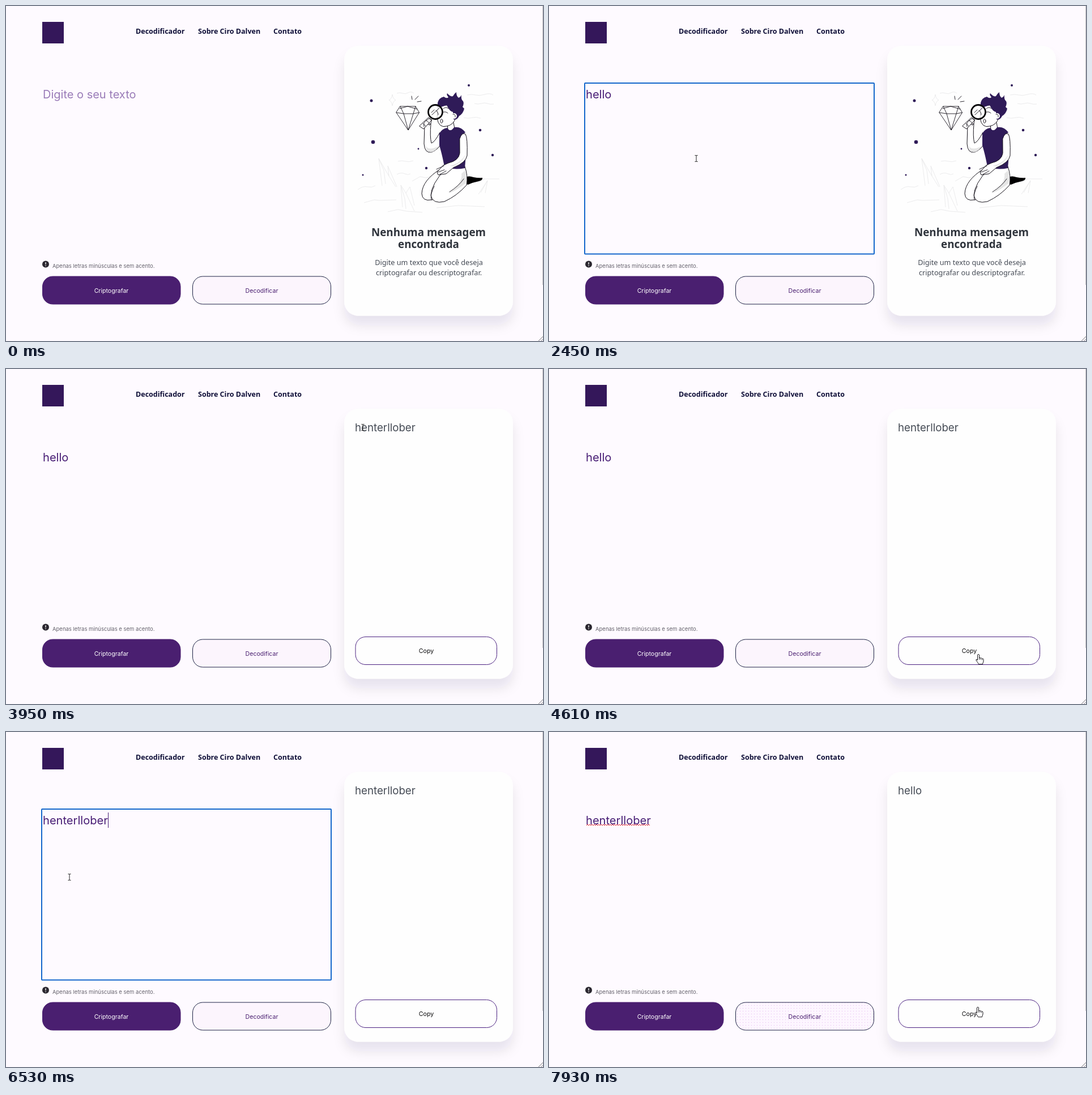
Animation of 948 by 591 pixels, one loop 7.99 s. Source, as an HTML page:

```html
<!DOCTYPE html>
<html lang="pt">
<head>
<meta charset="utf-8">
<title>Decodificador</title>
<style>
  html, body { margin: 0; width: 100%; height: 100%; overflow: hidden; background: #fefaff; }
  svg { display: block; width: 948px; height: 591px; }
  text { font-family: Inter, "Open Sans", sans-serif; white-space: pre; }
  .noto { font-family: "Noto Sans", "Open Sans", sans-serif; }
  .bold { font-weight: 700; }
  .mid { text-anchor: middle; }
  .faint { fill: none; stroke: #e9e9ea; stroke-width: .9; }
  .ink { fill: #fff; stroke: #17141c; stroke-width: 1; stroke-linejoin: round; stroke-linecap: round; }
  .line { fill: none; stroke: #17141c; stroke-width: .9; stroke-linecap: round; stroke-linejoin: round; }
  .shade { fill: #e6e6e6; }
  .plum { fill: #2f1b58; }
</style>
</head>
<body>
<svg viewBox="0 0 948 591">
  <defs>
    <filter id="shadow" x="-20%" y="-20%" width="140%" height="140%">
      <feDropShadow dx="0" dy="17" stdDeviation="10" flood-color="#25123a" flood-opacity=".09"/>
    </filter>
    <pattern id="dots" width="5" height="5" patternUnits="userSpaceOnUse">
      <rect width="5" height="5" fill="#fdf6ff"/>
      <circle cx="2.5" cy="2.5" r=".65" fill="#e8c3f1"/>
    </pattern>
  </defs>

  <rect width="948" height="591" fill="#fefaff"/>
  <rect x="64" y="28" width="38" height="38" fill="#34175a"/>
  <g class="nav" font-size="12.5" fill="#0f0f38">
    <text class="noto bold" x="229" y="49">Decodificador</text>
    <text class="noto bold" x="339" y="49">Sobre Ciro Dalven</text>
    <text class="noto bold" x="472" y="49">Contato</text>
  </g>

  <rect x="597" y="70" width="298" height="476.5" rx="25" fill="#fefefe" filter="url(#shadow)"/>

  <g id="empty">
    <g class="faint">
      <path d="M682 156Q683 164 688 166Q683 168 682 176Q681 168 676 166Q681 164 682 156Z"/>
      <path d="M690 154q5-2 10 0t10-1t10 1M814 157q8-2 15 0t16-1t15 1M827 172q6 2 12 0t11 0t11 1M808 197q8 2 15 0t15 1M692 274q7-2 13 0t14-1M690 297q8-4 14-1t10 0"/>
      <path d="M621 324q9-7 17-5t14-2M632 347l18-5 9 1 30-1M674 363l18-4 15 3 28 2M717 309l14-8 10 2 8-2M760 356l38-4 47 2M815 312l23-3 7-4 26 0"/>
      <path d="M664 317L658 269L676 300L688 319M658 269L667 290L670 314M676 300L674 282L690 319M700 355L697 316L706 330L721 362M697 316L704 340L706 358M706 330L713 319L721 352M834 332L850 308L846 330M850 308L838 329"/>
    </g>
    <g id="specks" class="plum"></g>
    <path class="line" d="M696 177H723L729.5 188L710 219L689 188ZM689 188L702 190H719L729.5 188M696 177L702 190L710 219L719 190L723 177M695 181L709 177L726 182M717 165L716 159M722 165L728 159M726 169L733 168"/>

    <path d="M808 304Q816 298 825 302Q835 304 841 303Q842 307 835 309Q825 311 816 315L808 314Z"/>
    <path class="ink" d="M768 287Q735 307 734 331Q735 345 751 342Q772 342 790 320Z"/>
    <path class="ink" d="M776 287Q751 314 750 334Q753 350 774 345Q796 335 813 316Q816 300 810 283Z"/>
    <path class="shade" d="M804 296Q807 312 781 331Q800 323 812 312Q814 302 810 290Z"/>
    <path class="line" d="M783 328Q800 317 808 305M751 342Q748 333 756 318"/>
    <path class="ink" d="M739 211L738 243Q739 260 751 258Q761 255 771 240L766 223Q757 240 751 242Q748 231 750 208Z"/>
    <path class="shade" d="M740 245Q745 257 764 247Q754 263 743 255Z"/>
    <path class="ink" d="M779 207L780 218Q786 223 792 216L789 201Z"/>
    <path class="plum" d="M765 225Q770 216 779 215Q784 224 791 214Q803 212 811 223Q803 227 802 240L812 262L810 286Q792 290 774 284Q770 262 765 246Z"/>
    <path class="ink" d="M801 234Q805 222 811 226Q815 232 814 264Q812 276 790 285L777 296L763 298L761 293L772 281L781 277Q799 273 801 260Z"/>
    <path class="shade" d="M783 282Q803 277 810 263Q809 273 790 283Z"/>
    <path class="line" d="M763 293L774 289M766 297L777 291M760 288L773 282"/>

    <path class="ink" d="M763 176L761 198Q764 216 778 212Q790 210 794 197L785 175Z"/>
    <path class="plum" d="M762 179Q760 163 773 160Q778 164 781 161Q777 157 779 154Q785 161 789 159Q791 155 795 152Q795 159 799 162Q803 160 804 157Q803 165 807 168Q809 172 806 178L809 181Q807 190 800 194Q796 202 790 200L789 187Q783 186 778 175Q770 178 762 179Z"/>
    <circle cx="791" cy="194" r="5" fill="#fff"/>
    <path class="line" d="M789 191q5-1 4 5M770 188q6-3 10 1M772 181q5-4 9 0"/>
    <ellipse class="line" cx="769" cy="203" rx="2" ry="3.5"/>
    <path class="ink" d="M746 197L752 201L737 217L730 212Z"/>
    <path class="line" d="M742 202l5 4M736 207l5 5M738 213q-2-7 4-11q7-7 9 1q0 5-4 8"/>
    <circle cx="758" cy="187" r="12.5" fill="#fff" fill-opacity=".75" stroke="#08070a" stroke-width="2.8"/>
    <path class="line" d="M752 192L765 180M759 184Q764 189 763 192M751 188L756 183"/>

    <g class="mid noto" >
      <g font-size="18.8" fill="#2f343c">
        <text class="noto bold" x="746" y="406">Nenhuma mensagem</text>
        <text class="noto bold" x="746" y="427">encontrada</text>
      </g>
      <g font-size="12.7" fill="#454b55">
        <text class="noto" x="746.5" y="456.5">Digite um texto que você deseja</text>
        <text class="noto" x="746.5" y="474.5">criptografar ou descriptografar.</text>
      </g>
    </g>
  </g>

  <g id="filled">
    <text id="result" x="616" y="109.5" font-size="18.7" fill="#454b55"></text>
    <rect id="copy" x="617" y="472.5" width="249.5" height="49" rx="18" stroke="#4a2080"/>
    <text class="mid" x="742" y="500.5" font-size="10.6" fill="#08080a">Copy</text>
  </g>

  <rect id="focus" x="63" y="136" width="511" height="301.5" rx="1" fill="none" stroke="#1467cb" stroke-width="2"/>
  <rect id="selection" y="142" height="27" fill="#0078d7"/>
  <text id="hint" x="65" y="162.7" font-size="20" fill="#9a7cb8">Digite o seu texto</text>
  <text id="typed" x="65" y="162.7" font-size="20.1" fill="#481d75"><tspan id="plain"></tspan><tspan id="picked" fill="#fff"></tspan></text>
  <path id="squiggle" fill="none" stroke="#e0262c"/>
  <rect id="caret" y="142" width="1" height="27" fill="#481d75"/>

  <circle cx="70" cy="455.5" r="6" fill="#2b2730"/>
  <path d="M70 452v4M70 457.6v1.3" stroke="#fff" stroke-width="1.3"/>
  <text x="82" y="461.5" font-size="9.5" fill="#65626c">Apenas letras minúsculas e sem acento.</text>

  <g class="mid" font-size="10.6">
    <rect id="encode" x="64.5" y="477" width="243.5" height="49" rx="18"/>
    <text id="encodeText" x="186" y="506.3">Criptografar</text>
    <rect id="decode" x="329.5" y="477" width="244" height="49" rx="18" stroke="#1d2244"/>
    <text x="451.5" y="506.3" fill="#4a1f70">Decodificar</text>
  </g>

  <path d="M947.5 0V492" stroke="#c3c0c5"/>
  <path d="M940 591L948 583M944.5 591L948 587.5" stroke="#77747a"/>

  <g id="cursor">
    <circle id="click" r="9" fill="#f4ec37" opacity=".75"/>
    <path id="arrow" d="M0 0V15L3.5 11.8L6 17L8.2 16L5.8 11H10.5Z" fill="#fff" stroke="#111" stroke-width=".9"/>
    <path id="beam" d="M-2.5-5.5H-.8L0-5L.8-5.5H2.5M0-5V5M-2.5 5.5H-.8L0 5L.8 5.5H2.5" fill="none" stroke="#222"/>
    <g id="hand">
      <path d="M-1.5 1.2Q0-.8 1.5 1.2V7Q3 5.6 4 7.2Q5.5 6.2 6.5 8Q8.7 7.2 9 9.5V13Q8 15 7.5 17.8H.5Q-1 14.5-4 11Q-4.4 9-2.8 9.2L-1.5 10.8Z" fill="#fff" stroke="#151318" stroke-width="1" stroke-linejoin="round"/>
      <path d="M1.5 7V10M4 7.5V10M6.5 8.5V10.5" stroke="#151318" stroke-width=".8"/>
    </g>
  </g>
</svg>

<script>
const LOOP = 7990;
const TEXT_X = 65;
const $ = id => document.getElementById(id);
const set = (id, attrs) => { for (const k in attrs) $(id).setAttribute(k, attrs[k]); };
const show = (id, on) => set(id, { visibility: on ? 'inherit' : 'hidden' });
const within = (t, spans) => spans.some(([a, b]) => t >= a && t < b);
const latest = (t, steps) => steps.reduce((value, [at, v]) => t >= at ? v : value, '');

const typing = [[1350, 'h'], [1490, 'he'], [1640, 'hel'], [1780, 'hell'], [1960, 'hello'], [6290, ''], [6470, 'henterllober']];
const results = [[3110, 'henterllober'], [7450, 'hello']];
const pickedFrom = [[5750, 4], [5870, 3], [5930, 2], [5990, 1], [6050, 0]];
const focused = [[620, 2930], [5510, 7390]];
const caretOn = [[620, 1100], [1350, 2140], [5510, 5750], [6290, 6710]];
const clicks = [[620, 740], [2930, 3110], [4430, 4610], [5510, 5630], [7390, 7510]];

// Each move: start, end, then the points passed through.
const moves = [
  [60, 440, [905, 592], [262, 260]],
  [2390, 2870, [262, 260], [201, 495]],
  [3530, 4370, [201, 495], [630, 103], [758, 503]],
  [4670, 5210, [758, 503], [432, 362]],
  [5210, 5510, [432, 362], [113, 158]],
  [5690, 5930, [113, 158], [78, 216]],
  [5930, 6110, [78, 216], [20, 232]],
  [6350, 6710, [20, 232], [205, 279]],
  [6710, 7330, [205, 279], [437, 490]],
  [7750, 7930, [437, 490], [757, 485]]
];

function pointer(t) {
  const move = moves.filter(m => t >= m[0]).pop();
  if (!move) return null;
  const [start, end, ...points] = move;
  const tick = Math.floor((t - start) / 60 + 1e-6) * 60;
  const p = t >= end ? 1 : Math.min(1, tick / (end - start));
  const legs = points.length - 1;
  const pos = (1 - Math.cos(p * Math.PI)) / 2 * legs;
  const i = Math.min(legs - 1, Math.floor(pos));
  return [0, 1].map(k => points[i][k] + (points[i + 1][k] - points[i][k]) * (pos - i));
}

function cursorKind(t, [x, y]) {
  const over = (l, top, r, b) => x >= l && x <= r && y >= top && y <= b;
  if (over(64, 477, 308, 526) || over(329, 477, 573, 526)) return 'hand';
  if (t >= 3110 && over(617, 472, 867, 522)) return 'hand';
  if (over(63, 136, 574, 438) || within(t, [[5690, 6350]])) return 'beam';
  if (t >= 3110 && over(617, 92, 725, 116)) return 'beam';
  return 'arrow';
}

function drawInput(t) {
  const text = latest(t, typing);
  const from = t < 6290 && t >= 5750 ? latest(t, pickedFrom) : text.length;
  $('plain').textContent = text.slice(0, from);
  const left = TEXT_X + $('typed').getComputedTextLength();
  $('picked').textContent = text.slice(from);
  const right = TEXT_X + $('typed').getComputedTextLength();
  show('hint', !text);
  show('focus', within(t, focused));
  show('selection', from < text.length);
  set('selection', { x: left, width: Math.max(0, right - left) });
  show('caret', within(t, caretOn));
  set('caret', { x: Math.round(right) });
  show('squiggle', t >= 7450);
  if (t >= 7450) {
    let d = `M${TEXT_X + 1} 165`;
    for (let x = TEXT_X + 1, up = true; x < right - 2; x += 2, up = !up) d += `l2 ${up ? -2 : 2}`;
    set('squiggle', { d });
  }
}

function draw(t) {
  drawInput(t);
  show('empty', t < 3110);
  show('filled', t >= 3110);
  $('result').textContent = latest(t, results);

  const encoding = within(t, [[2930, 3110]]);
  set('encode', { fill: encoding ? 'url(#dots)' : '#4a1f70', stroke: encoding ? '#f0a350' : '#4a1f70' });
  set('encodeText', { fill: encoding ? '#4a1f70' : '#fff' });
  set('decode', { fill: t >= 7390 ? 'url(#dots)' : '#fcf5fd' });
  set('copy', { fill: within(t, [[4430, 4610]]) ? 'url(#dots)' : '#fefefe' });

  const at = pointer(t);
  show('cursor', at);
  if (!at) return;
  set('cursor', { transform: `translate(${at.map(Math.round)})` });
  const kind = cursorKind(t, at);
  for (const id of ['arrow', 'beam', 'hand']) show(id, id === kind);
  show('click', within(t, clicks));
}

const specks = [[645, 167, 2.5], [817, 140, 2], [837, 219, 2.3], [648, 240, 3.3], [859, 263, 2.2], [742, 286, 2.2], [728, 252, 1.4], [630, 298, 1.5]];
$('specks').innerHTML = specks.map(([x, y, r]) => `<circle cx="${x}" cy="${y}" r="${r}"/>`).join('');

const began = performance.now();
function tick() {
  draw((performance.now() - began) % LOOP);
  requestAnimationFrame(tick);
}
tick();
</script>
</body>
</html>
```
